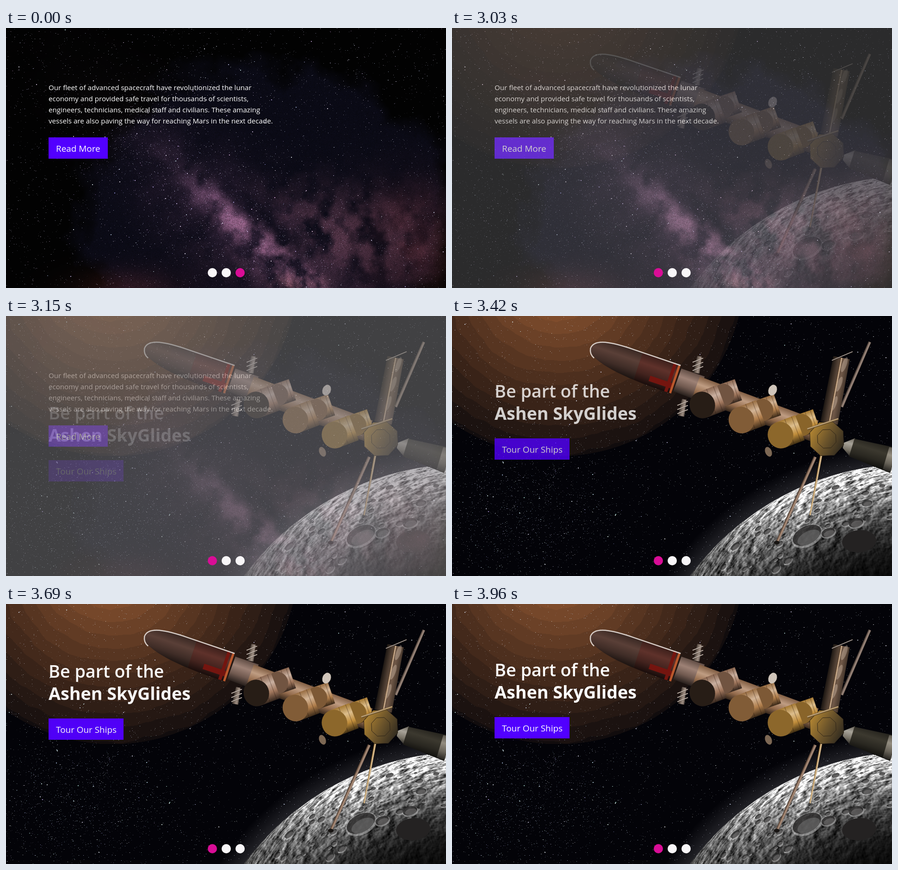
Recreate the animation shown at these times as an HTML page with a canvas. Size 951 by 561 pixels, loop 8510 ms.

```html
<!DOCTYPE html>
<html lang="en">
<head>
<meta charset="utf-8">
<title>Space slider</title>
<style>
html, body { margin: 0; width: 100%; height: 100%; overflow: hidden; background: #fff; }
.slide, .slide > *, .dots { position: absolute; left: 0; top: 0; width: 951px; height: 561px; }
text { font-family: "Open Sans", "Noto Sans", sans-serif; fill: #fff; white-space: pre; }
.copy { font-size: 15.14px; }
.label { font-size: 18.9px; }
.title { font-size: 37.7px; font-weight: 600; }
.strong { font-weight: 700; }
.button { fill: #5200ff; }
</style>
</head>
<body>
<div class="slide" id="galaxy">
  <canvas width="951" height="561"></canvas>
  <svg viewBox="0 0 951 561">
    <g class="copy">
      <text x="92" y="134">Our fleet of advanced spacecraft have revolutionized the lunar</text>
      <text x="92" y="158">economy and provided safe travel for thousands of scientists,</text>
      <text x="92" y="182">engineers, technicians, medical staff and civilians. These amazing</text>
      <text x="92" y="206">vessels are also paving the way for reaching Mars in the next decade.</text>
    </g>
    <rect class="button" x="92" y="236" width="128" height="46"/>
    <text class="label" x="108" y="267">Read More</text>
  </svg>
</div>
<div class="slide" id="station">
  <canvas width="951" height="561"></canvas>
  <svg viewBox="0 0 951 561">
    <g id="caption">
      <text class="title" x="92" y="156">Be part of the</text>
      <text class="title strong" x="92" y="204">Ashen SkyGlides</text>
      <rect class="button" x="92" y="244" width="162" height="46"/>
      <text class="label" x="108" y="275">Tour Our Ships</text>
    </g>
  </svg>
</div>
<svg class="dots" viewBox="0 0 951 561" fill="#f8f6f8">
  <circle id="first" cx="446" cy="528" r="10"/>
  <circle cx="476" cy="528" r="10"/>
  <circle id="last" cx="506" cy="528" r="10"/>
</svg>
<script>
const W = 951, H = 561;
const $ = id => document.getElementById(id);
const clamp = v => Math.min(1, Math.max(0, v));
const context = id => document.querySelector(`#${id} canvas`).getContext('2d');

let seed = 17;
function rnd() {
  seed = (seed * 1664525 + 1013904223) % 4294967296;
  return seed / 4294967296;
}
const spread = () => rnd() + rnd() + rnd() - 1.5;

function hash(x, y) {
  const s = Math.sin(x * 127.1 + y * 311.7) * 43758.5453;
  return s - Math.floor(s);
}
function noise(x, y) {
  const i = Math.floor(x), j = Math.floor(y);
  const ease = t => t * t * (3 - 2 * t);
  const u = ease(x - i), v = ease(y - j);
  const row = k => hash(i, k) * (1 - u) + hash(i + 1, k) * u;
  return row(j) * (1 - v) + row(j + 1) * v;
}
function fractal(x, y) {
  let sum = 0;
  for (let k = 0, gain = 0.53; k < 4; k++, gain /= 2) sum += gain * noise(x * 2 ** k + k * 9, y * 2 ** k);
  return sum;
}
const bump = (x, y, rx, ry) => Math.exp(-((x / rx) ** 2) - (y / ry) ** 2);

function fillPixels(c, colorAt) {
  const image = c.createImageData(W, H);
  for (let y = 0, i = 0; y < H; y++)
    for (let x = 0; x < W; x++, i += 4) image.data.set([...colorAt(x, y), 255], i);
  c.putImageData(image, 0, 0);
}
function stars(c, count, place, hue, saturation) {
  for (let i = 0; i < count; i++) {
    const [x, y] = place(), big = rnd() > 0.98;
    c.fillStyle = `hsla(${hue + 50 * spread()},${saturation}%,${75 + 20 * rnd()}%,${big ? 0.8 : 0.12 + 0.8 * rnd() ** 2})`;
    c.fillRect(Math.floor(x), Math.floor(y), big ? 2 : 1, big && rnd() > 0.5 ? 2 : 1);
  }
}
const anywhere = () => [rnd() * W, rnd() * H];

function paintGalaxy() {
  const c = context('galaxy'), tilt = 0.73;
  const cos = Math.cos(tilt), sin = Math.sin(tilt);
  fillPixels(c, (x, y) => {
    const along = (x - 430) * cos + (y - 365) * sin;
    const across = (y - 365) * cos - (x - 430) * sin;
    const rough = fractal(x / 60, y / 60);
    const dust = clamp(fractal(x / 30 + 40, y / 30) * 2.6 - 0.75);
    const field = clamp((1.03 - Math.hypot((x - 560) / 420, (y - 400) / 325) + (rough - 0.5) * 0.35) * 6);
    const wide = bump(across, along - 130, 95, 330) * rough;
    const band = bump(across + 8, along - 140, 36, 200) * dust;
    const haze = bump(x - 700, y - 450, 210, 100) * dust;
    const ember = bump(x - 885, y - 465, 100, 110) * rough + 0.5 * bump(x - 260, y - 560, 110, 40);
    const pink = bump(x - 632, y - 553, 50, 22) * dust;
    const rift = 1 - 0.75 * bump(across + 55, along - 150, 24, 150);
    const grain = 0.75 + 0.5 * hash(x, y);
    const mix = (base, w, b, h, e, p) =>
      2 + grain * (field * base + rift * (w * wide + b * band + h * haze + e * ember + p * pink));
    return [mix(8, 48, 82, 62, 62, 105), mix(8, 30, 54, 36, 24, 62), mix(19, 42, 70, 42, 22, 60)];
  });
  stars(c, 4200, anywhere, 250, 45);
  stars(c, 1800, () => {
    const along = 560 * (rnd() - 0.45), across = 160 * spread();
    return [430 + along * cos - across * sin, 365 + along * sin + across * cos];
  }, 260, 60);
}

const moon = { x: 991, y: 911, r: 592 };
const moonDistance = (x, y) => Math.hypot(x - moon.x, y - moon.y);

function sunColor(x, y) {
  const level = 1 - Math.hypot(x - 230, y + 100) / 402;
  if (level <= 0) return [3, 3, 8];
  const k = Math.round((level + 0.04 * fractal(x / 50, y / 50)) * 14) / 14;
  return [17 + 140 * k, 12 + 82 * k, 13 + 40 * k];
}
function moonLight(x, y, d) {
  const u = Math.atan2(y - moon.y, x - moon.x) * moon.r;
  const v = Math.asin(Math.min(1, d / moon.r)) * moon.r;
  const relief = fractal(u / 22, v / 22) - fractal(u / 22 + 0.16, v / 22 - 0.16);
  const shade = 10 + 222 * clamp((d - 340) / 252) ** 2;
  return shade * clamp(0.42 + (x - 540) / 330) * (1 + 4.2 * relief);
}
function paintSky(c) {
  fillPixels(c, (x, y) => {
    const d = moonDistance(x, y), inside = clamp(moon.r - d + 0.5);
    const haze = 30 * clamp(1 - (d - moon.r) / 45);
    const light = inside && moonLight(x, y, d);
    return sunColor(x, y).map(v => (v + haze) * (1 - inside) + light * inside);
  });
  const outside = place => () => {
    let p;
    do p = place(); while (moonDistance(...p) < moon.r + 4);
    return p;
  };
  stars(c, 3400, outside(anywhere), 220, 30);
  stars(c, 1500, outside(() => [160 + 220 * spread(), 420 + 150 * spread()]), 220, 60);
}

function disc(c, x, y, rx, ry, turn, fill) {
  c.beginPath();
  c.ellipse(x, y, rx, ry, turn, 0, 7);
  c.fillStyle = fill;
  c.fill();
}
function crater(c, x, y, r) {
  const flat = 1.25 - 0.8 * moonDistance(x, y) / moon.r;
  const turn = Math.atan2(y - moon.y, x - moon.x) + Math.PI / 2;
  disc(c, x + 1, y + 2, r * 1.1, r * flat * 1.15, turn, 'rgba(225,225,225,.4)');
  disc(c, x, y, r, r * flat, turn, 'rgba(20,19,19,.72)');
  disc(c, x + r * 0.12, y + r * 0.15, r * 0.8, r * flat * 0.7, turn, 'rgba(125,124,124,.5)');
}
function paintCraters(c) {
  for (let i = 0; i < 70; i++) {
    const angle = -2.5 + rnd(), d = moon.r * (0.78 + 0.2 * rnd());
    crater(c, moon.x + d * Math.cos(angle), moon.y + d * Math.sin(angle), 3 + 9 * rnd() ** 2);
  }
  crater(c, 767, 473, 33);
  crater(c, 873, 446, 16);
  crater(c, 813, 467, 15);
  disc(c, 880, 486, 37, 24, -0.1, '#242222');
}

// metal sheen across a part of the given width
function metal(c, width, hue, saturation, light) {
  const g = c.createLinearGradient(0, -width / 2, 0, width / 2);
  [0.9, 1.5, 1.05, 0.35].forEach((k, i) => g.addColorStop(i / 3, `hsl(${hue},${saturation}%,${light * k}%)`));
  return g;
}
// draws in a frame whose x axis runs from the first point to the second
function alongAxis(c, x1, y1, x2, y2, draw) {
  c.save();
  c.translate(x1, y1);
  c.rotate(Math.atan2(y2 - y1, x2 - x1));
  draw(Math.hypot(x2 - x1, y2 - y1));
  c.restore();
}
function beam(c, x1, y1, x2, y2, w1, w2, hue, saturation, light) {
  alongAxis(c, x1, y1, x2, y2, length => {
    c.beginPath();
    c.moveTo(0, -w1 / 2);
    c.lineTo(length, -w2 / 2);
    c.lineTo(length, w2 / 2);
    c.lineTo(0, w1 / 2);
    c.fillStyle = metal(c, Math.max(w1, w2), hue, saturation, light);
    c.fill();
  });
}
function tank(c, x, y, dx, dy, r, hue, saturation, face) {
  beam(c, x, y, x + dx, y + dy, 2 * r, 2 * r, hue, saturation, 47);
  alongAxis(c, x, y, x + dx, y + dy, length => {
    c.fillStyle = 'rgba(40,22,12,.45)';
    for (const k of [0.45, 0.8]) c.fillRect(length * k, -r, 1, 2 * r);
    disc(c, 0, 0, r * 0.95, r, 0, `hsl(${hue},${saturation}%,${face}%)`);
  });
}
function paintShuttle(c) {
  alongAxis(c, 298, 74, 484, 137, length => {
    c.beginPath();
    c.moveTo(length, -32);
    c.lineTo(90, -32);
    c.bezierCurveTo(40, -32, 0, -28, 0, -4);
    c.bezierCurveTo(0, 10, 40, 34, length, 32);
    c.save();
    c.clip();
    c.fillStyle = metal(c, 66, 14, 24, 19);
    c.fillRect(0, -36, 110, 72);
    c.fillStyle = metal(c, 66, 8, 38, 18);
    c.fillRect(110, -36, 90, 72);
    c.fillStyle = '#74150f';
    c.fillRect(length - 55, 10, 55, 12);
    c.fillRect(length - 16, -36, 7, 72);
    c.fillStyle = '#b9582c';
    c.fillRect(length - 5, -36, 5, 72);
    c.restore();
    c.beginPath();
    c.moveTo(length, -32);
    c.lineTo(90, -32);
    c.bezierCurveTo(40, -32, 0, -28, 0, -4);
    c.quadraticCurveTo(2, 8, 14, 13);
    c.lineWidth = 2.5;
    c.strokeStyle = '#d6ccc6';
    c.stroke();
  });
}
function paintHub(c, x, y, r) {
  const g = c.createLinearGradient(x - r, y - r / 2, x + r, y + r / 2);
  g.addColorStop(0, '#b98a33');
  g.addColorStop(0.5, '#6d552b');
  g.addColorStop(1, '#2a261e');
  c.fillStyle = g;
  c.strokeStyle = '#2f2518';
  c.lineWidth = 1;
  for (const size of [r, r * 0.55]) {
    c.beginPath();
    for (let i = 0; i < 8; i++)
      c.lineTo(x + size * Math.cos(0.35 + i * Math.PI / 4), y + size * Math.sin(0.35 + i * Math.PI / 4));
    c.closePath();
    c.fill();
    c.stroke();
  }
}
function rack(c, x, y) {
  beam(c, x + 4, y - 18, x - 3, y + 18, 10, 14, 25, 12, 38);
  for (let i = -1; i <= 1; i++) beam(c, x - 11, y + 9 * i + 4, x + 12, y + 9 * i - 5, 2, 2, 25, 15, 60);
}
function paintStation(c) {
  beam(c, 903, 56, 842, 196, 6, 7, 22, 14, 38);
  beam(c, 842, 90, 815, 231, 36, 38, 25, 22, 24);
  for (let i = 0; i < 3; i++) disc(c, 848 - i * 11, 105 + i * 42, 5, 17, 0.35, 'rgba(225,205,185,.35)');
  beam(c, 842, 90, 815, 231, 4, 4, 30, 32, 50);
  beam(c, 821, 96, 866, 77, 2, 2, 25, 10, 50);
  beam(c, 785, 304, 702, 489, 7, 6, 24, 22, 40);
  beam(c, 798, 300, 774, 430, 5, 3, 36, 45, 52);
  disc(c, 702, 489, 6, 4, 0, '#171412');
  beam(c, 846, 279, 866, 284, 12, 42, 40, 8, 42);
  beam(c, 864, 284, 955, 312, 40, 56, 45, 12, 14);
  beam(c, 938, 307, 955, 312, 50, 54, 40, 8, 36);

  paintShuttle(c);
  beam(c, 487, 138, 537, 156, 52, 54, 18, 17, 36);
  beam(c, 527, 154, 784, 248, 50, 48, 26, 32, 42);
  for (let i = 0; i < 3; i++) {
    const x = 541 + 84.5 * i, y = 192 + 32.5 * i, hue = 23 + 7 * i, saturation = 27 + 13 * i;
    tank(c, x + 46, y - 22, 32, -11, 24, hue, saturation, 35);
    tank(c, x, y, 42, -16, 29, hue, saturation, i ? 36 : 12);
  }
  paintHub(c, 810, 265, 39);
  beam(c, 768, 244, 835, 222, 4, 4, 36, 35, 45);
  rack(c, 531, 105);
  rack(c, 498, 198);
  disc(c, 693, 160, 9, 12, 0.4, '#d0c5ba');
  disc(c, 684, 293, 7, 11, -0.4, '#7d6854');
}

// each pose holds until the next step
const LOOP = 8510, CHANGE = 3030;
const STEPS = [0, CHANGE, 3150, 3300, 3420, 3570, 3690, 3810, 3960];
function play(id, styleAt) {
  const frames = STEPS.map(t => ({ offset: t / LOOP, easing: 'step-end', ...styleAt(t) }));
  frames.push({ ...styleAt(LOOP), offset: 1 });
  $(id).animate(frames, { duration: LOOP, iterations: Infinity });
}
const mix = t => clamp((t - 2930) / 490);
const remaining = t => (1 - clamp((t - CHANGE) / 950)) ** 3;
const dot = active => ({ fill: active ? '#d90d96' : '#f8f6f8' });

const stationCanvas = context('station');
paintGalaxy();
paintSky(stationCanvas);
paintCraters(stationCanvas);
paintStation(stationCanvas);

play('galaxy', t => ({ opacity: 1 - mix(t) }));
play('station', t => ({ opacity: mix(t) }));
play('caption', t => ({
  transform: `translateY(${Math.round(100 * remaining(t))}px)`,
  opacity: 1 - remaining(t)
}));
play('first', t => dot(t >= CHANGE));
play('last', t => dot(t < CHANGE));
</script>
</body>
</html>
```
